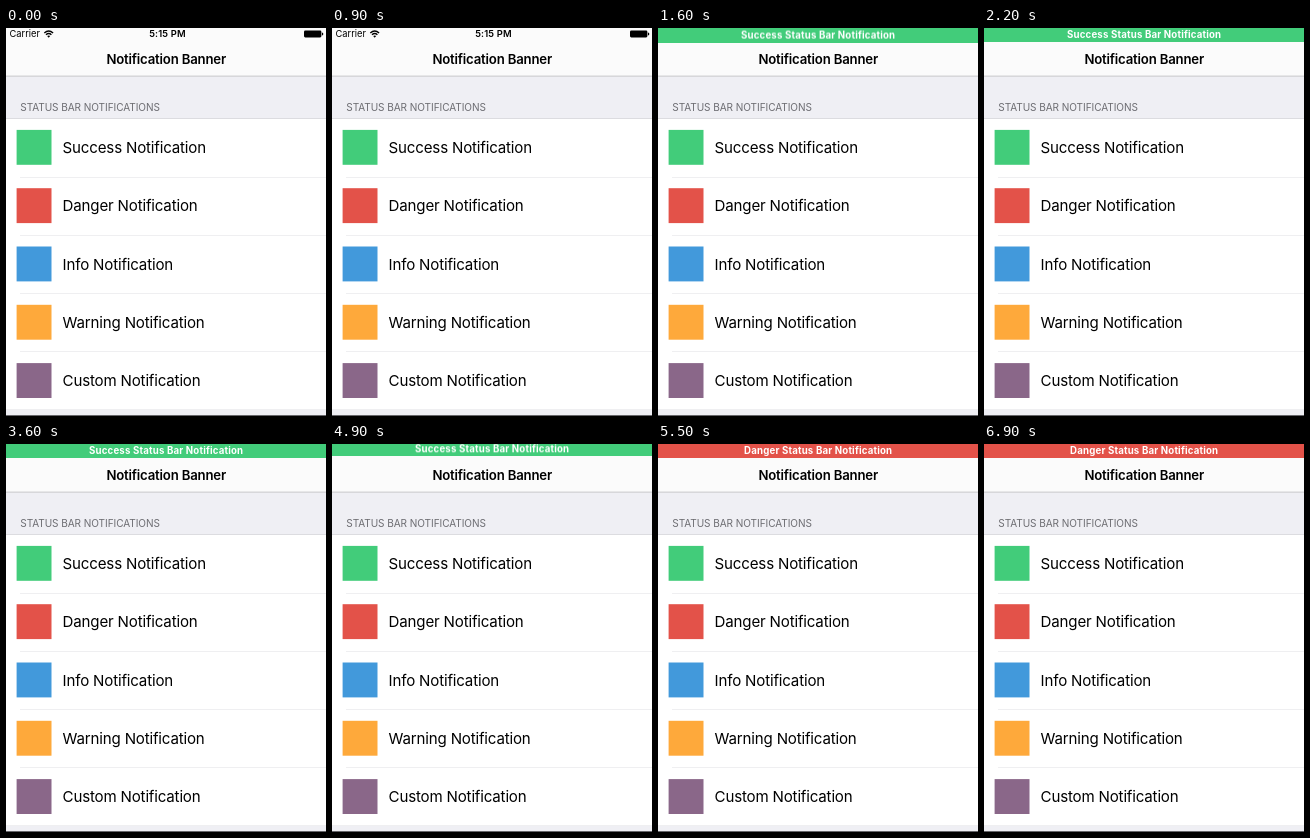
Animation of 320x388 px, one loop 8 s. Source, as an HTML page:

```html
<!DOCTYPE html>
<html lang="en">
<head>
<meta charset="utf-8">
<title>Notification Banner</title>
<style>
  html, body { margin: 0; width: 100%; height: 100%; overflow: hidden; background: #fff; }
  svg { display: block; width: 100vw; height: 100vh; }
  text { font-family: Inter, Roboto, "Liberation Sans", sans-serif; }
  .mid { text-anchor: middle; }
  .carrier { font-size: 9.3px; }
  .clock { font-size: 9.4px; font-weight: 600; letter-spacing: .15px; }
  .title { font-size: 13.2px; font-weight: 600; letter-spacing: -.19px; }
  .section { font-size: 10.05px; letter-spacing: -.06px; fill: #6d6d72; }
  .row text { font-size: 15.1px; letter-spacing: -.18px; }
  .banner text { font-size: 9.66px; font-weight: 700; letter-spacing: .17px; fill: #fff; }
  .edge { fill: #dcdce0; }
  .line { fill: #efeff1; }

  .status { animation: status 8s step-end infinite; }
  .banner { transform: translateY(-20px); }
  .success { animation: success 8s step-end infinite; }
  .danger { animation: danger 8s step-end infinite; }

  @keyframes status {
    0% { visibility: visible; }
    16.25%, 100% { visibility: hidden; }
  }
  /* spring in, ease out; held for 100 ms per step */
  @keyframes success {
    0% { transform: translateY(-20px); }
    16.25% { transform: translateY(-10px); }
    17.5% { transform: translateY(-2.7px); }
    18.75% { transform: translateY(.2px); }
    20% { transform: translateY(.6px); }
    21.25% { transform: translateY(0); }
    61.25% { transform: translateY(-1.7px); }
    62.5% { transform: translateY(-5.4px); }
    63.75% { transform: translateY(-10.6px); }
    65%, 100% { transform: translateY(-20px); }
  }
  @keyframes danger {
    0% { transform: translateY(-20px); }
    67.5% { transform: translateY(-6.5px); }
    68.75% { transform: translateY(0); }
    70% { transform: translateY(.7px); }
    71.25% { transform: translateY(.3px); }
    72.5%, 100% { transform: translateY(0); }
  }
</style>
</head>
<body>
<svg viewBox="0 0 320 388" preserveAspectRatio="none">
  <rect width="320" height="388" fill="#efeff4"/>
  <rect width="320" height="48" fill="#fbfbfb"/>
  <rect y="47.6" width="320" height="1" fill="#c8c8cb"/>
  <text class="title mid" x="160.2" y="35.6">Notification Banner</text>
  <text class="section" x="14.3" y="82.7">STATUS BAR NOTIFICATIONS</text>

  <rect y="91" width="320" height="290" fill="#fff"/>
  <rect class="edge" y="90" width="320" height="1"/>
  <g id="rows"></g>
  <rect class="line" y="381" width="320" height="1"/>
  <rect y="387" width="320" height="1" fill="#66666a"/>

  <g class="status">
    <text class="carrier" x="3.5" y="9.3">Carrier</text>
    <g fill="none" stroke="#000" stroke-width="1.4">
      <path d="M38.3 4.9Q42.7 .9 47.1 4.9"/>
      <path d="M40 6.8Q42.7 4.4 45.4 6.8"/>
    </g>
    <path d="M41.2 8.1Q42.7 6.9 44.2 8.1L42.7 9.7Z"/>
    <text class="clock mid" x="161.5" y="9.3">5:15 PM</text>
    <rect x="298" y="2.6" width="17.4" height="6.8" rx="1.3"/>
    <path d="M316 4.6q1.3 .3 1.3 1.4t-1.3 1.4z"/>
  </g>

  <g class="banner success">
    <rect y="-30" width="320" height="44" fill="#42cc7a"/>
    <text class="mid" x="160.2" y="9.7">Success Status Bar Notification</text>
  </g>
  <g class="banner danger">
    <rect y="-30" width="320" height="44" fill="#e35249"/>
    <text class="mid" x="160.2" y="9.7">Danger Status Bar Notification</text>
  </g>
</svg>
<script>
  const kinds = [
    ["Success", "#42cc7a"],
    ["Danger", "#e35249"],
    ["Info", "#4299db"],
    ["Warning", "#fea93b"],
    ["Custom", "#8a6789"]
  ];
  const pitch = 58.3;
  document.getElementById("rows").innerHTML = kinds.map(([name, color], i) => {
    const y = 91 + i * pitch;
    const line = i ? `<rect class="line" x="14" y="${Math.round(y - 0.8)}" width="306" height="1"/>` : "";
    return `<g class="row">${line}
      <rect x="10.6" y="${y + 10.9}" width="34.9" height="34.9" fill="${color}"/>
      <text x="56.6" y="${y + 33.9}">${name} Notification</text></g>`;
  }).join("");
</script>
</body>
</html>
```
